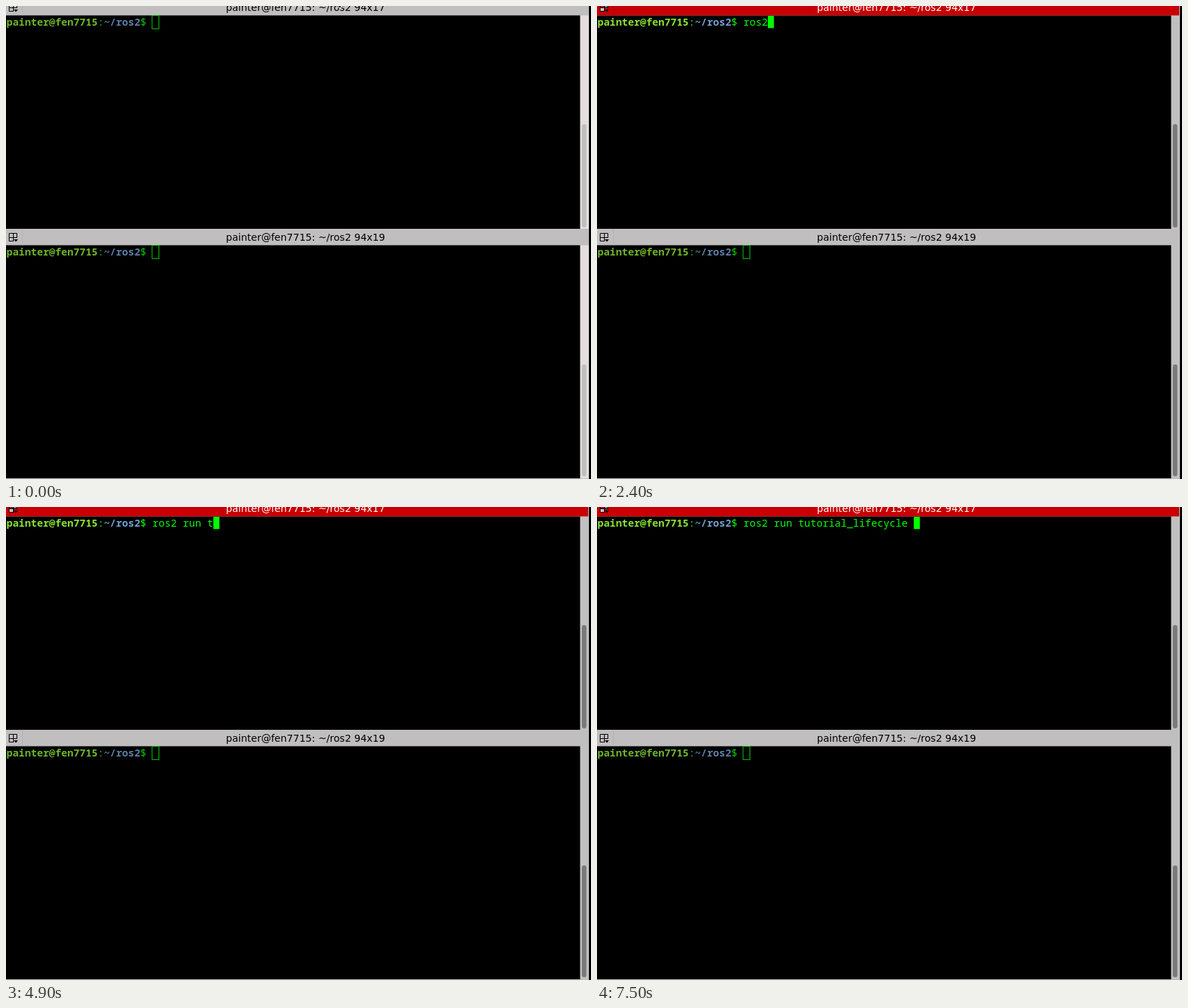
Recreate the animation shown at these times as an HTML page with a canvas. Size 832x673 px, loop 8000 ms.

```html
<!DOCTYPE html>
<html lang="en">
<head>
<meta charset="utf-8">
<title>Terminal</title>
<style>
html, body { margin: 0; width: 100%; height: 100%; overflow: hidden; background: #000; }
canvas { display: block; }
</style>
</head>
<body>
<canvas id="stage" width="832" height="673"></canvas>
<script>
const g = document.getElementById('stage').getContext('2d');
const LOOP = 8000, CELL = 8.65, LEFT = 0.76, SPLIT = 327;
const USER = 'painter@fen7715', DIR = '~/ros2';
const COMMAND = 'ros2 run tutorial_lifecycle ';
const PROMPT = USER.length + DIR.length + 3;

// [time, characters typed]
const TYPED = [
  [1900, 1], [2000, 2], [2400, 4], [2800, 6], [3000, 7], [3100, 8], [3500, 9],
  [4900, 10], [5000, 11], [5200, 12], [5500, 15], [5800, 17], [6500, 19],
  [6700, 21], [6800, 22], [7500, 28]
];
const BLINKS = [[1300, 1900], [4000, 4500]];
const BRIGHT = { user: '#8ae234', dir: '#729fcf', text: '#00ff00' };
const DIM = { user: '#6eb52a', dir: '#5b7fa6', text: '#00cc00' };
const GREY = '#c0bebf';

function box(x, y, w, h, color) {
  g.fillStyle = color;
  g.fillRect(x, y, w, h);
}

function mix(a, b, k) {
  return `rgb(${a.map((v, i) => Math.round(v + (b[i] - v) * k))})`;
}

function cells(str, col, y, color, bold) {
  g.font = `${bold ? 'bold ' : ''}14.4px "Noto Sans Mono", "DejaVu Sans Mono", monospace`;
  g.textAlign = 'left';
  g.fillStyle = color;
  [...str].forEach((ch, i) => g.fillText(ch, LEFT + (col + i) * CELL, y));
}

function icon(y, active) {
  if (active) {
    box(4, y + 6, 6, 6, '#c8c4c5');
    box(10, y, 6, 6, '#56808c');
  }
  g.strokeStyle = '#000';
  g.lineWidth = 1;
  g.beginPath();
  g.moveTo(11, y + 11.5);
  g.lineTo(4.5, y + 11.5);
  g.lineTo(4.5, y + 0.5);
  g.lineTo(15.5, y + 0.5);
  g.lineTo(15.5, y + 7);
  g.moveTo(4, y + 6.5);
  g.lineTo(16, y + 6.5);
  g.moveTo(10.5, y);
  g.lineTo(10.5, y + 12);
  g.stroke();
  g.fillStyle = '#000';
  g.beginPath();
  g.moveTo(11, y + 9);
  g.lineTo(17, y + 9);
  g.lineTo(14, y + 12.5);
  g.fill();
}

function titleBar(y, size, active) {
  box(0, y - 10, 829, 23.4, GREY);
  if (active) box(0, y - 10, 828, 23.4, '#c80003');
  else box(23, y - 10, 1, 23.4, '#b3b1b2');
  icon(y - 4, active);
  g.font = '14px "DejaVu Sans", sans-serif';
  g.textAlign = 'center';
  g.fillStyle = active ? '#fff' : '#000';
  g.fillText(`${USER}: ${DIR} ${size}`, 426, y + 7);
}

function prompt(y, c) {
  cells(USER, 0, y, c.user, true);
  cells(':', USER.length, y, c.text);
  cells(DIR, USER.length + 1, y, c.dir, true);
  cells('$', PROMPT - 2, y, c.text);
}

function hollowCursor(y) {
  g.strokeStyle = DIM.text;
  g.lineWidth = 1;
  g.strokeRect(207.8, y + 13.6, 9.7, 18.8);
}

function solidCursor(col) {
  box(LEFT + col * CELL, 14.1, CELL, 17.3, BRIGHT.text);
}

function scrollbar(y, h, thumbY, thumbH, k) {
  box(816.5, y, 12.5, h, mix([228, 221, 222], [192, 192, 192], k));
  g.fillStyle = mix([193, 190, 191], [122, 122, 122], k);
  g.beginPath();
  g.roundRect(819, thumbY, 6.5, thumbH, 3);
  g.fill();
}

function beam(x, y) {
  box(x - 3, y, 7, 1, '#ddd');
  box(x - 3, y + 13, 7, 1, '#ddd');
  box(x, y, 1, 14, '#ddd');
}

function pointer(t) {
  if (t < 200) {
    g.lineWidth = 1;
    g.strokeStyle = '#fff';
    g.fillStyle = '#000';
    g.beginPath();
    g.moveTo(471, -2);
    g.lineTo(474, 3);
    g.lineTo(477, 2);
    g.lineTo(475, -2);
    g.fill();
    g.stroke();
  } else if (t < 300) beam(460, 28);
  else if (t < 500) beam(456, 48);
  else if (t < 1900) beam(456, 51);
}

function draw(t) {
  const active = t >= 700;
  const fade = Math.min(1, Math.max(0, Math.floor(t / 100) - 7) / 3);
  const colors = active ? BRIGHT : DIM;
  const count = TYPED.reduce((n, [at, len]) => t >= at ? len : n, 0);
  const hidden = BLINKS.some(([from, to]) => t >= from && t < to);

  box(0, 0, 832, 673, '#000');
  scrollbar(13, 305, 168, 147, fade);
  scrollbar(340, 332, 510, 159, fade);
  titleBar(0, '94x17', active);
  titleBar(SPLIT, '94x19', false);
  box(0, 672, 829, 1, GREY);

  prompt(28, colors);
  cells(COMMAND.slice(0, count), PROMPT, 28, BRIGHT.text);
  if (!active) hollowCursor(0);
  else if (!hidden) solidCursor(PROMPT + count);

  prompt(28 + SPLIT, DIM);
  hollowCursor(SPLIT);
  pointer(t);
}

const start = performance.now();
function tick() {
  draw((performance.now() - start) % LOOP);
  requestAnimationFrame(tick);
}
tick();
</script>
</body>
</html>
```
